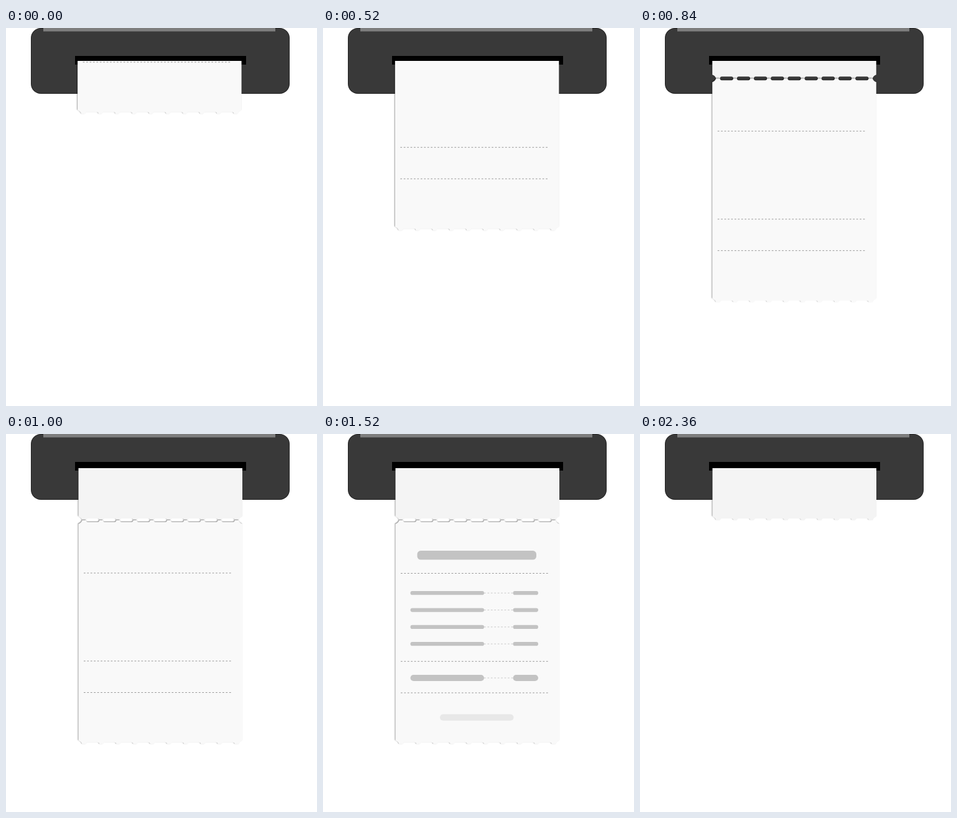
Animation of 500x609 px, one loop 3 s. Source, as an HTML page with a canvas:

```html
<!DOCTYPE html>
<html lang="en">
<head>
<meta charset="utf-8">
<title>Receipt printer</title>
<style>
html, body { margin: 0; width: 100%; height: 100%; overflow: hidden; background: #fff; }
canvas { display: block; }
</style>
</head>
<body>
<canvas id="stage" width="500" height="609"></canvas>
<script>
const ctx = document.getElementById('stage').getContext('2d');
const LOOP = 3000, STEP = 40;
const LEFT = 116.5, RIGHT = 380, TEAR = 139, END = 499.8, TRAVEL = 361.5;
const HOLES = 9, PITCH = 27.2, HOLE_W = 21.6, NOTCH = 6;
const ROWS = [256.2, 283.6, 310.9, 338.2];
// loose strips: centre x, centre y after one step, width, height
const STRIPS = [[258.3, 169.9, 11.5, 48], [300, 184.5, 11, 38], [221, 226, 11, 49]];

function box(x, y, w, h, r, fill) {
  ctx.fillStyle = fill;
  ctx.beginPath();
  ctx.roundRect(x, y, w, h, r);
  ctx.fill();
}

function bar(x1, x2, y, h, fill) {
  box(x1, y - h / 2, x2 - x1, h, Math.min(h / 2, 5.5), fill);
}

function dashes(x1, x2, y, color) {
  ctx.strokeStyle = color;
  ctx.lineWidth = 1;
  ctx.setLineDash([2.72, 2.72]);
  ctx.beginPath();
  ctx.moveTo(x1, y);
  ctx.lineTo(x2, y);
  ctx.stroke();
}

// Soft shadow towards the top left.
function shadow(on) {
  ctx.shadowColor = on ? 'rgba(0,0,0,0.42)' : 'transparent';
  ctx.shadowBlur = on ? 1.6 : 0;
  ctx.shadowOffsetX = ctx.shadowOffsetY = on ? -0.9 : 0;
}

// Perforated edge at y; side is 1 for a top edge, -1 for a bottom edge.
function edge(y, side) {
  const flip = x => side > 0 ? x : LEFT + RIGHT - x;
  const q = (cx, cy, x, ey) => ctx.quadraticCurveTo(flip(cx), cy, flip(x), ey);
  const deep = y + 3 * side;
  const span = (HOLES - 1) * PITCH + HOLE_W;
  const first = (LEFT + RIGHT - span) / 2;
  ctx.lineTo(flip(LEFT), y + NOTCH * side);
  q(LEFT + 4.5, y + 4.5 * side, LEFT + NOTCH, y);
  for (let i = 0; i < HOLES; i++) {
    const x = first + i * PITCH, end = x + HOLE_W;
    ctx.lineTo(flip(x), y);
    q(x + 0.5, deep, x + 3, deep);
    ctx.lineTo(flip(end - 3), deep);
    q(end - 0.5, deep, end, y);
  }
  ctx.lineTo(flip(RIGHT - NOTCH), y);
  q(RIGHT - 4.5, y + 4.5 * side, RIGHT, y + NOTCH * side);
}

function sheet(top, bottom, fill) {
  ctx.beginPath();
  edge(top, 1);
  edge(bottom, -1);
  ctx.closePath();
  shadow(true);
  ctx.fillStyle = fill;
  ctx.fill();
  shadow(false);
}

// Share of the slide-in still to go.
function remaining(t) {
  const u = Math.min(1, Math.max(0, (t - 1280) / 240));
  return Math.pow(1 - u, 2.42);
}

function printout(t) {
  if (t < 1280) return;
  const rest = remaining(t);
  ctx.save();
  if (t < 1320) {
    ctx.beginPath();
    ctx.rect(LEFT, TEAR, RIGHT - LEFT, END - TEAR);
    ctx.clip();
  }
  ctx.translate(-68.5 * rest, -1.5 * rest);
  ctx.globalAlpha = 1 - 0.6 * rest;
  const ink = '#c3c3c3';
  const pair = (y, h) => {
    dashes(259, 305.5, y, '#c8c8c8');
    bar(140.5, 259, y, h, ink);
    bar(305.5, 346, y, h, ink);
  };
  bar(151.5, 343, 195.3, 14.4, ink);
  ROWS.forEach(y => pair(y, 6.2));
  pair(393, 10.2);
  bar(188, 306.5, 456.7, 10.2, '#e8e8e8');
  ctx.restore();
}

function paper(t) {
  const left = 1 - Math.min(1, t / 1000);
  const n = Math.max(0, (t - 2120) / STEP);
  const fall = 74.5 * n * (1 + 0.01 * Math.max(0, n - 1));

  ctx.save();
  ctx.beginPath();
  ctx.rect(0, t < 1000 ? 53 : 55, 500, 609);
  ctx.clip();
  ctx.translate(-1.4 * left, -TRAVEL * left);
  sheet(-400, TEAR, '#f4f4f4');
  if (t < 2360) {
    ctx.translate(0, fall);
    sheet(TEAR, END, '#f9f9f9');
    const lift = 0.5 * remaining(t);
    [224.5, 366.3, 417].forEach(y => dashes(125, 363, y - lift, '#969696'));
    printout(t);
  }
  ctx.restore();

  if (n > 0 && t < 2360) {
    shadow(true);
    for (const [x, y, w, h] of STRIPS) {
      const cy = TEAR + (y - TEAR) * n;
      box(x - w / 2, cy - h / 2, w, h, w / 2, '#fff');
    }
    shadow(false);
  }
}

function printer() {
  box(40, 0, 416, 106, 16, '#222');
  box(41, 1, 414, 104, 15, '#393939');
  ctx.fillStyle = '#7e7e7e';
  ctx.fillRect(60, 0, 373, 5.5);
  ctx.fillStyle = '#000';
  ctx.fillRect(111, 45, 275, 14);
}

function draw(t) {
  ctx.fillStyle = '#fff';
  ctx.fillRect(0, 0, 500, 609);
  printer();
  paper(t);
}

const start = performance.now();
function tick() {
  const t = (performance.now() - start) % LOOP;
  draw(Math.floor(t / STEP) * STEP);
  requestAnimationFrame(tick);
}
tick();
</script>
</body>
</html>
```
